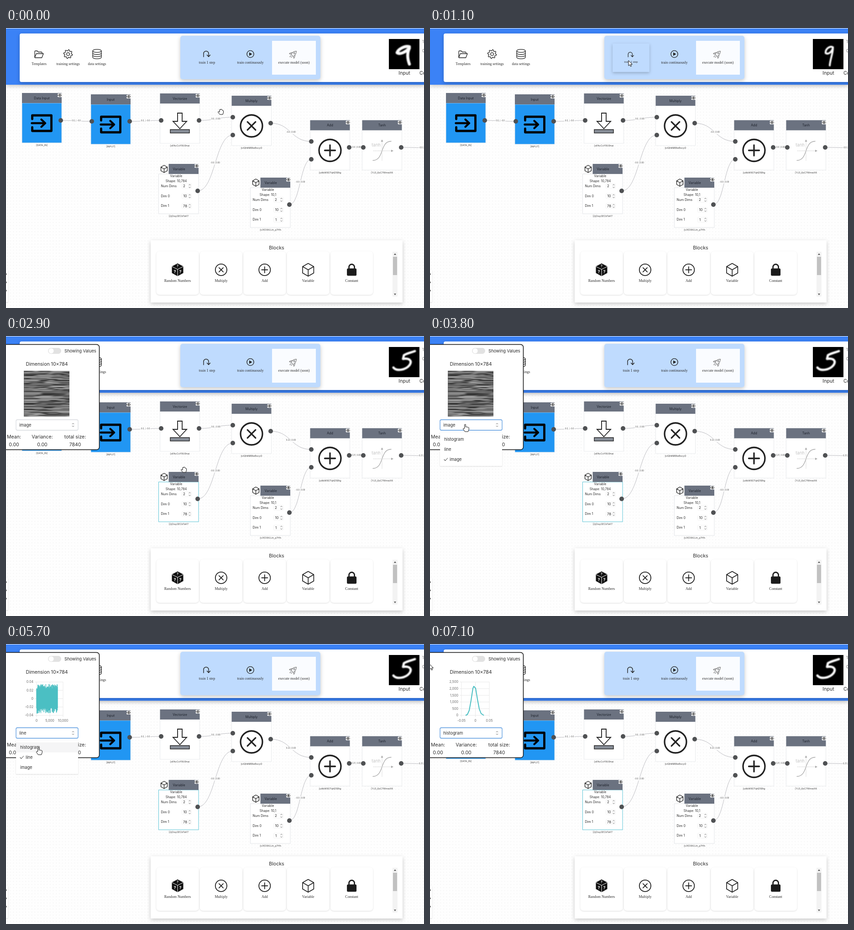
An HTML page for the animation above (7200 ms loop, 916 by 612 pixels).

```html
<!DOCTYPE html>
<html lang="en">
<head>
<meta charset="utf-8">
<title>Block editor</title>
<style>
  html, body { margin: 0; width: 100%; height: 100%; overflow: hidden; background: #fff; }
  svg#stage { display: block; width: 916px; height: 612px; }
  text { font-family: Inter, Roboto, sans-serif; fill: #2b2b2b; }
  .serif { font-family: "Liberation Serif", "Noto Serif", serif; }
  .line { fill: none; stroke: #222; stroke-width: 1.3; stroke-linecap: round; stroke-linejoin: round; }
  .card { filter: drop-shadow(0 3px 4px rgba(0,0,0,.22)); }
  .tile { filter: drop-shadow(0 1px 1.5px rgba(0,0,0,.13)); }
  .digit { fill: none; stroke: #fff; stroke-linecap: round; stroke-linejoin: round; filter: blur(.8px); }
  .grid { fill: none; stroke: #e4e4e4; stroke-width: .8; }
  .axis text { fill: #666; }
</style>
</head>
<body>
<svg id="stage" viewBox="0 0 916 612"></svg>
<script>
const LOOP = 7200;
const stage = document.getElementById('stage');
const $ = id => document.getElementById(id);

// ---------- drawing helpers ----------
const text = (x, y, s, size, o = {}) =>
  `<text x="${x}" y="${y + size * .35}" font-size="${size}" text-anchor="${o.at || 'middle'}"` +
  `${o.cls ? ` class="${o.cls}"` : ''}${o.id ? ` id="${o.id}"` : ''}${o.fill ? ` style="fill:${o.fill}"` : ''}>${s}</text>`;
const serif = (x, y, s) => text(x, y, s, 8, { cls: 'serif' });
const rect = (x, y, w, h, fill, more = '') =>
  `<rect x="${x}" y="${y}" width="${w}" height="${h}" fill="${fill}" ${more}/>`;
const line = (d, more = '') => `<path class="line" d="${d}" ${more}/>`;
const ring = (x, y, r, w) => line(`M${x - r} ${y}a${r} ${r} 0 1 1 ${2 * r} 0a${r} ${r} 0 1 1 ${-2 * r} 0`, `style="stroke-width:${w}"`);
const group = (x, y, body, more = '') => `<g transform="translate(${x} ${y})" ${more}>${body}</g>`;
const dot = (x, y) => `<circle cx="${x}" cy="${y}" r="5" fill="#4f5153"/>`;

function random(seed) {
  return () => (seed = (seed * 16807) % 2147483647) / 2147483647;
}

// ---------- icons, centred on 0,0 ----------
const cube = r => {
  const w = r * .87, h = r / 2;
  return line(`M0 ${-r}L${w} ${-h}V${h}L0 ${r}L${-w} ${h}V${-h}ZM${-w} ${-h}L0 0L${w} ${-h}M0 0V${r}`, `style="stroke-width:${r > 10 ? 1.7 : 1.3}"`);
};
const crossed = (r, arm, w, turn) => ring(0, 0, r, w) +
  line(`M${-arm} 0H${arm}M0 ${-arm}V${arm}`, `style="stroke-width:${w}" transform="rotate(${turn})"`);
const eye = group(0, 0, rect(-4.8, -4, 9.6, 8, '#fff', 'rx="1.5"') +
  line('M-4 0Q0-5.4 4 0Q0 5.4-4 0Z', 'style="stroke-width:1"') + '<circle r="1.4" fill="#222"/>');
const inlet = line('M-21-9V-17H21V17H-21V9', 'style="stroke:#000;stroke-width:4.8"') +
  line('M-22 0H7M-1-8L7.5 0L-1 8', 'style="stroke:#000;stroke-width:4.4"');
const download = `<path d="M-5-23H5V-5H15L0 11L-15-5H-5Z" fill="#fff" stroke="#222" stroke-width="1.8"/>` +
  rect(-21, 13, 42, 7.5, '#888e98', 'stroke="#222" stroke-width="1.4"');
const tanh = text(-13, -12, 'tanh', 9.5, { fill: '#c4c4c4' }) +
  line('M-20 22C5 22-5-20 20-20', 'style="stroke:#aaa"') +
  line('M0 22V-20M-19 1H21', 'style="stroke:#ccc;stroke-width:.8" stroke-dasharray="2 1.5"') +
  '<path d="M0-24l-2.5 5h5zM25 1l-5-2.5v5z" fill="#aaa"/>';
const folder = line('M-9 6V-6.5q0-1.500 1.500-1.500h4l2 2.500h7q1.500 0 1.500 1.500V-2M-9 6.500L-5.500-2H10L6.500 7H-8.500z');
const gear = (() => {
  let d = '';
  for (let i = 0; i < 32; i++) {
    const r = i % 4 < 2 ? 9.6 : 7.3, a = (i + .5) * Math.PI / 16;
    d += `${i ? 'L' : 'M'}${(r * Math.cos(a)).toFixed(1)} ${(r * Math.sin(a)).toFixed(1)}`;
  }
  return line(d + 'Z') + ring(0, 0, 3.2, 1.3);
})();
const disks = line('M-9.500-7a9.500 3.300 0 0 1 19 0a9.500 3.300 0 0 1-19 0V7a9.500 3.300 0 0 0 19 0V-7M-9.500-2.300a9.500 3.300 0 0 0 19 0M-9.500 2.400a9.500 3.300 0 0 0 19 0');
const stepIcon = line('M-6.500 6V-1a5.500 5.500 0 0 1 11 0V5M1 2L4.500 5.800L8 2', 'style="stroke-width:1.4"');
const play = ring(0, 0, 7.6, 1.4) + '<path d="M-2.500-3.800L4 0L-2.500 3.800Z" fill="#222"/>';
const rocket = `<g transform="rotate(45)">` +
  line('M0-9Q5-4 3.500 4H-3.500Q-5-4 0-9ZM-4-1L-7 4V6L-3.500 4M4-1L7 4V6L3.500 4M-1.500 6V10M1.500 6V9', 'style="stroke:#777;stroke-width:1.1"') +
  '<circle cy="-2.500" r="1.500" fill="none" stroke="#777"/></g>';
const dice = '<path d="M0-14L12.500-7.500V7L0 14L-12.500 7V-7.500Z" fill="#111"/>' +
  line('M-12-7L0-1L12-7M0-1V14', 'style="stroke:#fff;stroke-width:1"') +
  [[0, -7.5, 7], [-6, 4, 9], [6, 4, 9]].map(([x, y, s]) => text(x, y, '?', s, { fill: '#fff' })).join('').replace(/<text/g, '<text font-weight="700"');
const lock = rect(-10.500, -3, 21, 16, '#1b1b1b', 'rx="2.500"') + line('M-6-3V-6a6 6 0 0 1 12 0V-3', 'style="stroke-width:2.8"');
const spinner = line('M-1.800-1.800L0-3.800L1.800-1.800M-1.800 1.800L0 3.800L1.800 1.800', 'style="stroke:#666;stroke-width:.9"');

// ---------- editor canvas ----------
function node(x, y, name, code, icon, fill = '#fff') {
  return rect(x, y + 22, 87, 87, fill, 'stroke="#e3e5e8" stroke-width=".8"') + rect(x, y, 87, 22, '#6b7280') +
    text(x + 43.5, y + 11.500, name, 7.1, { fill: '#1d222b' }) + group(x + 83, y + 5, eye) +
    group(x + 43.5, y + 66, icon) + text(x + 43.5, y + 114.500, code, 5.3, { fill: '#444' });
}
function variable(x, y, shape, dim, code, id) {
  const field = (cy, label, value) => text(x + 5, cy, label, 7.1, { at: 'start' }) +
    rect(x + 51, cy - 5.500, 21, 11, '#fff', 'stroke="#eee" stroke-width=".7" rx="1.500"') +
    text(x + (value > 9 ? 58 : 56), cy, value, 7.8) + group(x + 68, cy, spinner);
  return rect(x, y + 22, 87.500, 87, '#fff', `id="${id}" stroke="#e3e5e8"`) + rect(x + 22, y, 65.500, 22, '#6b7280') +
    group(x + 12, y + 11, cube(8)) + text(x + 44.500, y + 11.500, 'Variable', 7.1, { fill: '#1d222b' }) +
    group(x + 83.500, y + 4.500, eye) + text(x + 38.500, y + 27, 'Variable', 7) + text(x + 38.500, y + 38, shape, 7) +
    field(y + 48.500, 'Num Dims', 2) + field(y + 70.500, 'Dim 0', 10) + field(y + 92, 'Dim 1', dim) +
    text(x + 44, y + 114.500, code, 5.3, { fill: '#444' });
}
function edge(x1, y1, x2, y2, label, id = '') {
  const mx = (x1 + x2) / 2, my = (y1 + y2) / 2;
  return `<path d="M${x1} ${y1}C${mx} ${y1} ${mx} ${y2} ${x2} ${y2}" fill="none" stroke="#b5b5ba" stroke-width=".9"/>` +
    rect(mx - 11, my - 3.500, 22, 7, '#fff') + text(mx, my, label, 4.2, { id, fill: '#444' });
}
const zero = '-0.0 | 0.00', plain = '0.0, | -0.0';
const editor =
  rect(0, 124, 916, 488, 'url(#dots)') +
  node(35, 142, 'Data Input', '[DATA_IN]', inlet, '#2196f3') +
  node(186, 145, 'Input', '[INPUT]', inlet, '#2196f3') +
  node(337.500, 143, 'Vectorize', '[eFAcCoY9U9nai', download) +
  node(494.500, 148, 'Multiply', '[oIQfdNBBwBxcyO', crossed(24, 12.500, 3.300, 45)) +
  node(666.500, 201.500, 'Add', '[uAbW9OTqhD5Btg', crossed(24, 11.500, 3.300, 0)) +
  node(780.500, 201.500, 'Tanh', '[YJ3_6zC7WmwXK', tanh) +
  variable(334.500, 297, 'Shape: 10,784', 78, '[2jOisySECbTsKT', 'picked') +
  variable(535.500, 327, 'Shape: 10,1', 1, '[v3fZXKUJn_p7Hh', 'other') +
  edge(120, 202, 188, 204, plain) + edge(271, 204, 340, 202, plain) + edge(423, 202, 497, 195, '0.0, | 0.00') +
  edge(420, 356, 497, 234, zero) + edge(580, 208, 669, 248, zero, 'sum') + edge(621, 386, 669, 287, zero) +
  edge(752, 261, 783, 261, zero, 'act') + edge(866, 261, 964, 263, zero, 'out') +
  [[120, 202], [188, 204], [271, 204], [340, 202], [423, 202], [497, 195], [497, 234], [580, 208], [669, 248],
    [669, 287], [752, 261], [783, 261], [866, 261], [420, 356], [621, 386]].map(p => dot(...p)).join('');

// ---------- toolbar ----------
const digits = [
  ['M884 41C873 38 859 47 857 54C864 59 876 52 884 44C878 56 880 68 884 79', 6.500],
  ['M883 42C875 38 866 47 867 55C874 59 881 51 883 43C883 56 877 68 876 82', 4],
  ['M896 33C888 36 877 38 872 42L870 50C884 48 891 54 884 64C876 74 856 78 849 69', 5]
].map(([d, w], i) => `<path id="digit${i}" class="digit" d="${d}" stroke-width="${w}"/>`).join('');
const toolbar =
  rect(0, 1, 916, 123, '#3b82f6', 'class="card"') + rect(30, 12, 900, 106, '#fff', 'rx="4" class="card"') +
  group(72, 58, folder) + group(136, 57, gear) + group(199.500, 57, disks) +
  serif(72.500, 78, 'Templates') + serif(136, 78, 'training settings') + serif(199.500, 78, 'data settings') +
  rect(382, 17, 307, 95, '#bfdbfe', 'rx="5" class="card"') +
  group(440.500, 65, `<g id="step">${rect(-48, -37, 96, 74, '#bfdbfe', 'id="stepTile" class="card"')}${group(-1, -8, stepIcon)}${serif(0, 10, 'train 1 step')}</g>`) +
  group(535.500, 57, play) + serif(535.500, 75, 'train continuously') +
  rect(583, 28, 96, 74, '#fafcff') + group(630, 57, rocket) + serif(631, 75, 'execute model (soon)') +
  rect(839, 24, 67, 66, '#000') + digits + text(873, 98, 'Input', 10.600) +
  text(906, 98, 'Confidence', 10.600, { at: 'start' }) +
  text(912, 30, '1.0', 8.500, { at: 'start', fill: '#777' }) + text(912, 50, '0.9', 8.500, { at: 'start', fill: '#777' });

// ---------- block palette ----------
const palette =
  rect(317, 464, 552, 136, '#fff', 'class="card"') + text(593, 480, 'Blocks', 10.600) +
  [['Random Numbers', dice], ['Multiply', crossed(12.600, 6.500, 1.800, 45)], ['Add', crossed(12.600, 6.500, 1.800, 0)],
    ['Variable', cube(14)], ['Constant', lock]].map(([name, icon], i) => {
    const x = 376 + i * 95.400;
    return rect(x - 46.500, 488, 93, 95, '#fff', 'rx="7" class="tile"') + group(x, 528.500, icon) + serif(x, 552, name);
  }).join('') +
  rect(847, 489, 11, 98, '#f3f3f3') + rect(848, 500, 9, 40, '#c1c1c1') +
  '<path d="M850 496l2.500-3.500 2.500 3.500zM850 580.500l2.500 3.500 2.500-3.500z" fill="#555"/>' +
  rect(-10, 529, 14.500, 70, '#fff', 'class="tile"') +
  [538, 556, 574].map(y => rect(0, y - 1.500, 1.300, 3, '#333')).join('');

// ---------- inspector popup ----------
function streaks() {
  const rnd = random(77);
  let out = '';
  for (let y = 0; y < 100; y += 2) {
    for (let x = 0; x < 100;) {
      const w = 8 + rnd() * 34, v = Math.round(45 + rnd() * 120);
      out += rect(x.toFixed(1), y, w.toFixed(1), 2, `rgb(${v},${v},${v})`);
      x += w;
    }
  }
  return `<svg id="image" x="39" y="76" width="100" height="100">${rect(0, 0, 100, 100, '#6c6c6c')}<g filter="url(#smear)">${out}</g></svg>`;
}
function axes(x0, x1, xs, ys, labelX) {
  const step = 73 / (ys.length - 1);
  const at = i => x0 + i * (x1 - x0) / 2;
  return `<g class="axis">` +
    ys.map((s, i) => `<path class="grid" d="M${x0 - 4} ${83 + i * step}H${x1}"/>` + text(labelX, 83 + i * step, s, 7.100, { at: 'end' })).join('') +
    xs.map((s, i) => `<path class="grid" d="M${at(i)} 83V160"/>` + text(at(i), 168, s, 7.100)).join('') + '</g>';
}
const curve = (id, w) => `<path id="${id}" fill="none" stroke="#4bbfc3" stroke-width="${w}" stroke-linejoin="round"/>`;
const popup = `<g id="popup">` +
  rect(-20, 18.500, 224.500, 230, '#fff', 'rx="6" stroke="#111" stroke-width="1.500"') +
  rect(92, 26, 29, 13, '#e2e2e2', 'rx="6.500"') + '<circle cx="99" cy="32.500" r="5.500" fill="#fff"/>' +
  text(128, 32.500, 'Showing Values', 9.300, { at: 'start' }) + text(89.500, 61, 'Dimension 10×784', 10.500) +
  streaks() +
  `<g id="line">${axes(67, 125, ['0', '5,000', '10,000'], ['0.04', '0.02', '0', '-0.02', '-0.04'], 60)}${curve('wave', 1)}</g>` +
  `<g id="histogram">${axes(69, 130, ['-0.05', '0', '0.05'], ['2,500', '2,000', '1,500', '1,000', '500', '0'], 62)}${curve('bell', 2)}</g>` +
  rect(22, 183, 136, 23, '#fff', 'id="select" rx="3" stroke-width="1.300"') + text(29, 194.500, '', 9.200, { at: 'start', id: 'choice' }) +
  group(147, 194.500, spinner) +
  [['Mean:', '0.00', 17.500], ['Variance:', '0.00', 79.500], ['total size:', '7840', 151.500]]
    .map(([a, b, x]) => text(x, 220, a, 10.500) + text(x, 237, b, 10.500)).join('') +
  `<g id="menu">${rect(22, 211, 136, 73, '#fff', 'class="tile"')}${rect(22, 215, 136, 22, '#f5f5f6', 'id="hover"')}` +
  ['histogram', 'line', 'image'].map((s, i) => text(31, 226 + i * 22, s, 9.200, { at: 'start', id: 'item' + i })).join('') +
  line('M31 0L33.500 2.500L38.500-3', 'id="check" style="stroke:#555;stroke-width:1.100"') + '</g></g>';

// ---------- cursors, hotspot on 0,0 ----------
const skin = 'fill="#fff" stroke="#111" stroke-width="1" stroke-linejoin="round"';
const cursors =
  `<path id="arrow" ${skin} d="M0 0V11.500L2.700 9L4.500 13L6.500 12.200L4.700 8.300H8.300Z"/>` +
  `<path id="pointer" ${skin} d="M-1.300 9V.800Q0-1 1.300.800V6Q2.600 4.800 3.800 6.200Q5 5 6.200 6.800Q7.600 6 8.200 7.500V11.500L6.500 16H-.500L-4.500 10.500Q-4.500 8.500-2.800 9Z"/>` +
  `<path id="grab" ${skin} d="M-3 1V-4Q-2-5.800-1-4V-5Q.100-6.800 1.200-5V-4.200Q2.400-5.600 3.400-3.800V-2.500Q4.700-3.500 5.400-2V2L4 6H-2.500L-6.500.800Q-6.200-1-4.500-.200Z"/>` +
  `<path id="beam" class="line" style="stroke-width:1.100" d="M-2.500-6Q0-6 0-4.500Q0-6 2.500-6M0-4.500V4.500M-2.500 6Q0 6 0 4.500Q0 6 2.500 6M-1 1.500H1"/>`;

stage.innerHTML = `<defs>
  <pattern id="dots" width="6.700" height="6.700" patternUnits="userSpaceOnUse">${rect(0, 0, 6.700, 6.700, '#fefefe')}<circle cx="3" cy="3" r=".550" fill="#dedede"/></pattern>
  <filter id="smear"><feGaussianBlur stdDeviation="3 .300"/></filter></defs>` +
  editor + toolbar + palette + popup + `<g id="cursor">${cursors}</g>`;

// ---------- motion ----------
const track = [
  [0, 471, 183, 'grab'], [100, 471, 183, 'grab'], [400, 456, 130, 'grab'], [500, 449, 108, 'arrow'], [800, 435, 71, 'arrow'],
  [1500, 435, 71, 'arrow'], [1700, 431, 135, 'grab'], [2000, 424, 290, 'pointer'], [2100, 423, 301, 'pointer'],
  [2800, 423, 301, 'pointer'], [2900, 390, 292, 'grab'], [3200, 190, 222, 'arrow'], [3400, 95, 196, 'pointer'],
  [3600, 77, 193, 'pointer'], [3900, 77, 193, 'pointer'], [4200, 60, 243, 'pointer'], [4500, 60, 243, 'pointer'],
  [4600, 75, 232, 'arrow'], [4800, 104, 213, 'beam'], [5000, 98, 208, 'beam'], [5200, 84, 192, 'pointer'],
  [5400, 80, 192, 'pointer'], [5700, 71, 226, 'pointer'], [6200, 71, 226, 'pointer'], [6300, 66, 212, 'arrow'],
  [6800, 24, 108, 'arrow'], [7100, -1, 44, 'arrow'], [LOOP, -1, 44, 'arrow']
];
const rnd = random(2024);
const peaks = Array.from({ length: 320 }, (_, i) => (i % 2 ? 1 : -1) * (20 + 12 * rnd() ** 2 + (i < 24 ? 3 * rnd() : 0)));
const bell = [[78, 0], [82, 2], [86, 11], [90, 33], [94, 59], [96, 63.500], [100, 59], [104, 35], [108, 14], [112, 4], [118, 0]];

const show = (id, on) => $(id).setAttribute('display', on ? 'inline' : 'none');
const toPath = pts => 'M' + pts.map(([x, y]) => `${x.toFixed(1)} ${y.toFixed(1)}`).join('L');
const clamp = v => Math.min(1, Math.max(0, v));

function cursorAt(t) {
  const i = track.findIndex(k => k[0] > t) - 1;
  const [t0, x0, y0, kind] = track[i], [t1, x1, y1] = track[i + 1];
  const p = (t - t0) / (t1 - t0);
  return { x: x0 + (x1 - x0) * p, y: y0 + (y1 - y0) * p, kind };
}

function draw(t) {
  const c = cursorAt(t);
  $('cursor').setAttribute('transform', `translate(${c.x} ${c.y})`);
  for (const kind of ['arrow', 'pointer', 'grab', 'beam']) show(kind, kind === c.kind);

  const over = Math.abs(c.x - 440.500) < 48 && c.y > 28 && c.y < 102;
  show('stepTile', over);
  $('step').setAttribute('transform', `scale(${over ? .84 : 1})`);

  const digit = t < 900 ? 0 : t < 1300 ? 1 : 2;
  for (let i = 0; i < 3; i++) show('digit' + i, i === digit);
  const trained = digit === 2;
  $('sum').textContent = trained ? '0.22 | 0.00' : zero;
  $('act').textContent = $('out').textContent = trained ? '0.21 | 0.00' : zero;

  $('picked').setAttribute('stroke', t >= 2400 ? '#5cc4d6' : '#e3e5e8');
  show('popup', t >= 2500);
  const mode = t < 4500 ? 'image' : t < 6100 ? 'line' : 'histogram';
  for (const m of ['image', 'line', 'histogram']) show(m, m === mode);
  $('choice').textContent = mode;
  $('select').setAttribute('stroke', t < 3700 ? '#d9dce0' : '#5b9be0');

  show('menu', (t >= 3700 && t < 4500) || (t >= 5400 && t < 6100));
  const picked = mode === 'image' ? 2 : 1, row = Math.floor((c.y - 215) / 22);
  for (let i = 0; i < 3; i++) $('item' + i).setAttribute('x', i === picked ? 43 : 31);
  $('check').setAttribute('transform', `translate(0 ${226 + picked * 22})`);
  show('hover', row >= 0 && row < 3);
  $('hover').setAttribute('y', 215 + row * 22);

  // the wave fills out from left to right, the bell rises from its base
  const grow = clamp((t - 4500) / 1000) || .02;
  const bend = .21 * (1 / grow - 1);
  $('wave').setAttribute('d', toPath(peaks.map((v, i) => {
    const u = i / (peaks.length - 1);
    return [67 + 46 * u, 119.500 - v * (1 - u) ** bend];
  })));
  const rise = 1 - (1 - clamp((t - 6100) / 1000)) ** 4;
  $('bell').setAttribute('d', toPath(bell.map(([x, h]) => [x, 156 - h * rise])));
}

const start = performance.now();
let last = -1;
function tick() {
  const t = Math.floor((performance.now() - start) % LOOP / 100) * 100;
  if (t !== last) draw(last = t);
  requestAnimationFrame(tick);
}
tick();
</script>
</body>
</html>
```
